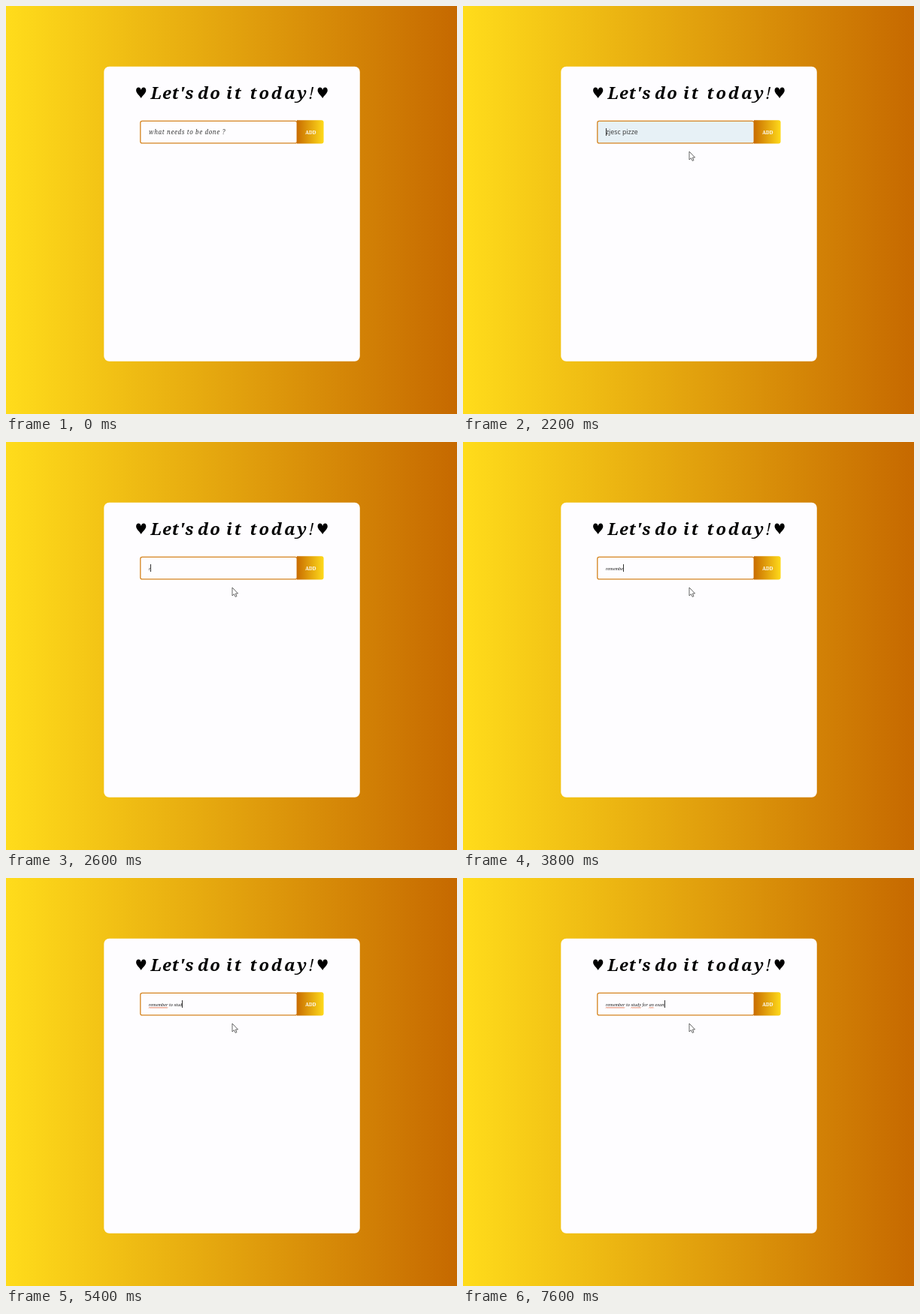
Animation of 600 by 544 pixels, one loop 8000 ms. Source, as an HTML page with a canvas:

```html
<!DOCTYPE html>
<html lang="en">
<head>
<meta charset="utf-8">
<title>Let's do it today!</title>
<style>
html, body { margin: 0; width: 100%; height: 100%; overflow: hidden; }
canvas { display: block; width: 600px; height: 544px; }
</style>
</head>
<body>
<canvas id="stage" width="600" height="544"></canvas>
<script>
const ctx = document.getElementById('stage').getContext('2d');
const LOOP = 8000, STEP = 200, TYPE_START = 2600;
const SCRIPT = '"Noto Serif", serif';
const HAND = 'italic 6.35px "Liberation Serif", serif';
const TASK = 'remember to study for an exam';
// Letters visible after each typing step
const TYPED = [1, 2, 3, 4, 5, 6, 7, 8, 9, 11, 12, 13, 14, 15, 16, 17, 18,
  19, 20, 21, 23, 24, 26, 26, 28, 29, 29];
// Words flagged by the spell checker: start and end index
const FLAGGED = [[0, 8], [12, 17], [22, 24]];
const LEFT = 190, BASE = 170.7;

function text(str, x, y, font, color, spacing = 0) {
  ctx.font = font;
  ctx.fillStyle = color;
  ctx.letterSpacing = spacing + 'px';
  ctx.fillText(str, x, y);
}

function box(x, y, w, h, radius, fill, stroke) {
  ctx.beginPath();
  ctx.roundRect(x, y, w, h, radius);
  ctx.fillStyle = fill;
  ctx.fill();
  if (!stroke) return;
  ctx.strokeStyle = stroke;
  ctx.lineWidth = 1.3;
  ctx.stroke();
}

function blend(x0, x1, from, to) {
  const g = ctx.createLinearGradient(x0, 0, x1, 0);
  g.addColorStop(0, from);
  g.addColorStop(1, to);
  return g;
}

function heart(x, y) {
  ctx.beginPath();
  ctx.moveTo(x, y + 14.5);
  ctx.bezierCurveTo(x - 1.5, y + 11, x - 6.6, y + 8, x - 6.6, y + 4);
  ctx.bezierCurveTo(x - 6.6, y - 1, x - 1, y - 1.5, x, y + 3.5);
  ctx.bezierCurveTo(x + 1, y - 1.5, x + 6.6, y - 1, x + 6.6, y + 4);
  ctx.bezierCurveTo(x + 6.6, y + 8, x + 1.5, y + 11, x, y + 14.5);
  ctx.fillStyle = '#000';
  ctx.fill();
}

function page(fieldColor) {
  ctx.fillStyle = blend(0, 600, '#ffdc1b', '#c66900');
  ctx.fillRect(0, 0, 600, 544);
  box(130.3, 80.7, 340.5, 393.1, 7, '#fefdff');

  heart(179.7, 108.4);
  heart(421.2, 108.4);
  const title = 'italic bold 22px ' + SCRIPT;
  text("Let's", 192.5, 123.8, title, '#000', 1);
  text('do', 255, 123.8, title, '#000', 1.5);
  text('it', 293, 123.8, title, '#000', 3);
  text('today', 324.5, 123.8, title, '#000', 2.8);
  text('!', 403.3, 123.8, 'italic 22px "Open Sans", sans-serif', '#000');

  box(178.8, 153.3, 208.4, 29.6, 2.5, fieldColor, '#d5841f');
  box(387, 152.2, 35.6, 31.2, [0, 3, 3, 0], blend(387, 423, '#c96d00', '#ffdb1b'));
  text('ADD', 398.3, 170.8, 'bold 6.3px ' + SCRIPT, '#fff');
}

function caret(x) {
  ctx.fillStyle = '#333';
  ctx.fillRect(Math.round(x), 163, 1, 10);
}

function squiggle(x0, x1) {
  ctx.beginPath();
  ctx.moveTo(x0, 173.4);
  for (let x = x0 + 1, up = true; x <= x1; x++, up = !up) ctx.lineTo(x, up ? 172.4 : 173.4);
  ctx.strokeStyle = '#e0643c';
  ctx.lineWidth = 0.9;
  ctx.stroke();
}

function typing(count) {
  text(TASK.slice(0, count), LEFT, BASE, HAND, '#1c1c1c');
  const at = n => LEFT + ctx.measureText(TASK.slice(0, n)).width;
  const end = at(count);
  for (const [a, b] of FLAGGED) if (count > b) squiggle(at(a), at(b));
  caret(end - 0.5);
}

function beam(x, y) {
  ctx.beginPath();
  for (const dy of [-5, 5]) {
    ctx.moveTo(x - 2.5, y + dy);
    ctx.lineTo(x + 2.5, y + dy);
  }
  ctx.moveTo(x, y - 5);
  ctx.lineTo(x, y + 5);
  ctx.strokeStyle = '#555';
  ctx.lineWidth = 1;
  ctx.stroke();
}

function arrow(x, y) {
  const pts = [[0, 0], [0, 11], [2.5, 8.7], [4.2, 12.4], [6, 11.6], [4.4, 8], [7.6, 8]];
  ctx.beginPath();
  for (const [dx, dy] of pts) ctx.lineTo(x + dx, y + dy);
  ctx.closePath();
  ctx.fillStyle = '#fff';
  ctx.fill();
  ctx.strokeStyle = '#555';
  ctx.lineWidth = 0.9;
  ctx.stroke();
}

function draw(t) {
  const preview = t >= 2200 && t < TYPE_START;
  page(preview ? '#e7f1f6' : '#fefdff');
  if (t < 2200) {
    text('what needs to be done ?', LEFT, 170.7, 'italic 8px ' + SCRIPT, '#3c3c3c', 0.6);
    if (t >= 2000) {
      caret(LEFT);
      beam(302.5, 183);
    }
    return;
  }
  if (preview) {
    text('zjesc pizze', LEFT, 170.5, '8.8px "Open Sans", sans-serif', '#333');
    if (t < 2400) caret(LEFT);
  } else {
    typing(TYPED[Math.floor((t - TYPE_START) / STEP)]);
  }
  arrow(301, 194);
}

const start = performance.now();
function tick() {
  draw((performance.now() - start) % LOOP);
  requestAnimationFrame(tick);
}
tick();
</script>
</body>
</html>
```
